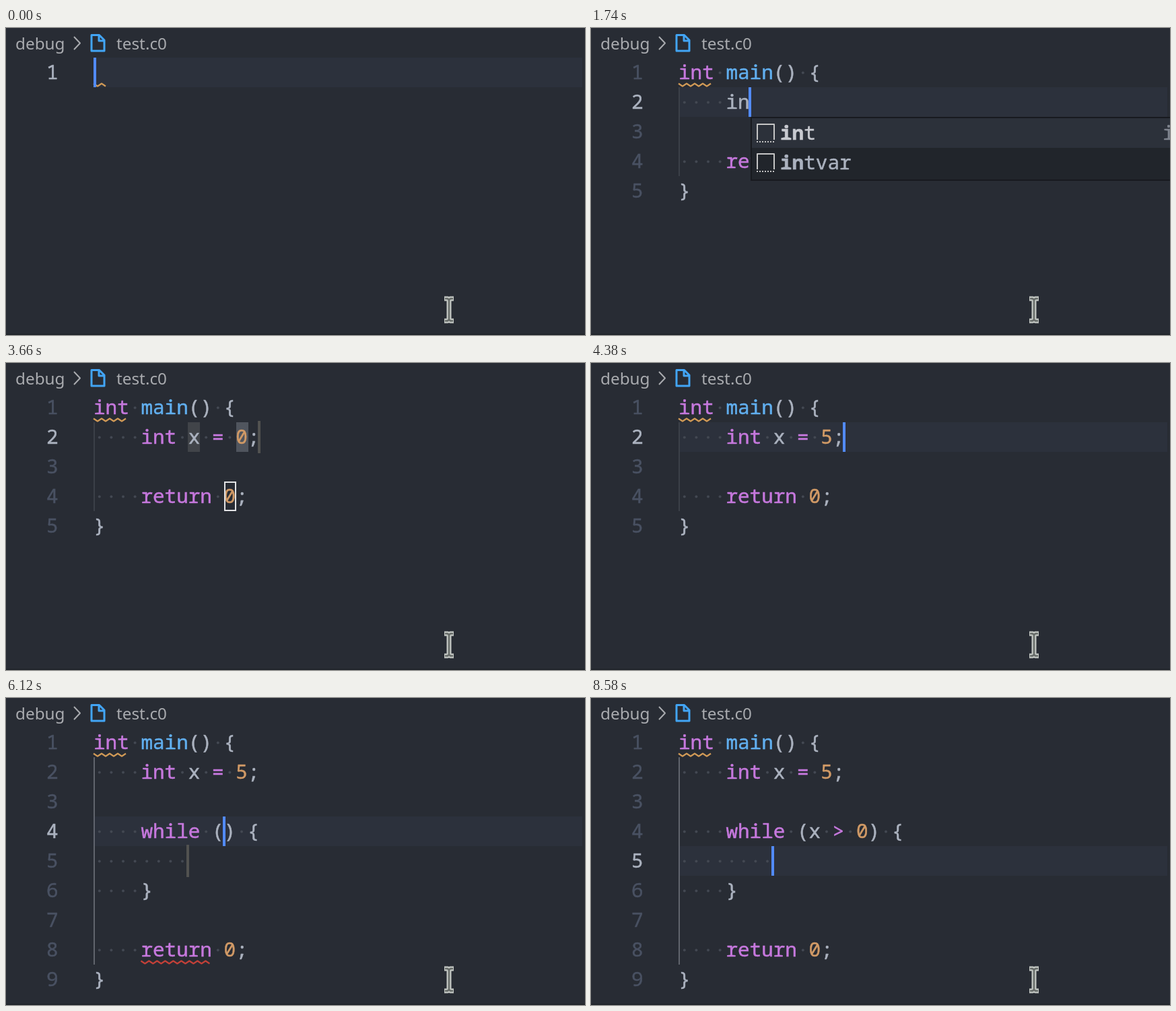
An HTML page that plays this animation: 860 px wide and 456 px high, repeating every 8.94 s.

```html
<!DOCTYPE html>
<html lang="en">
<head>
<meta charset="utf-8">
<title>Snippet typing</title>
<style>
  html, body { margin: 0; width: 100%; height: 100%; overflow: hidden; background: #282c34; }
  svg { display: block; }
  .mono { font: 29.333px "Noto Sans Mono", monospace; }
  .mono text { stroke-width: 0.5px; }
  .crumb { font: 24.3px "Noto Sans", sans-serif; fill: #a9abaf; }
  .line { fill: none; stroke-linejoin: round; }
</style>
</head>
<body>
<svg width="860" height="456" viewBox="0 0 860 456">
  <rect width="860" height="456" fill="#282c34"/>
  <text class="crumb" x="14" y="32">debug</text>
  <path class="line" d="M101 13l9 9.500l-9 9.500" stroke="#a9abaf" stroke-width="2"/>
  <path class="line" d="M127 10.500h11.500l7.500 7.500v16h-19zM138 10.500v8.500h8" stroke="#42a5f5" stroke-width="3"/>
  <text class="crumb" x="164" y="32">test.c0</text>
  <g id="view" class="mono"></g>
  <rect y="454" width="860" height="2" fill="#21252b"/>
  <g id="beam" class="line">
    <path d="M651 402h5l2 2l2-2h5M651 435h5l2-2l2 2h5M658 404v29" stroke="#c3c7c3" stroke-width="7"/>
    <path d="M652 402h4l2 2l2-2h4M652 435h4l2-2l2 2h4M658 404v29" stroke="#666b68" stroke-width="2.500"/>
  </g>
  <path id="arrow" d="M658 418v32l7-7l5 11l5-2l-5-11h10z" fill="#fff" stroke="#000" stroke-width="1.500"/>
</svg>
<script>
const LOOP = 8940, LEFT = 130, CHAR = 17.6, ROW = 44;
const view = document.getElementById('view');
const beam = document.getElementById('beam');
const arrow = document.getElementById('arrow');

const program = (...body) => ['int main() {', ...body, '', '    return 0;', '}'];
const loop = cond => program('    int x = 5;', '', `    while (${cond}) {`, '        ', '    }');
const typed = s => ({ code: [s], at: [1, s.length] });
const inBody = s => ({ code: program(s), at: [2, s.length] });
const inCond = s => ({ code: loop(s), at: [4, 11 + s.length] });

// Each step changes only the listed parts of the editor state.
const steps = [
  [0, { ...typed(''), warn: [1, 0, 1] }],
  [360, typed('m')],
  [480, { ...typed('ma'), warn: null, err: [1, 0, 2] }],
  [600, { ...typed('mai'), err: [1, 0, 3] }],
  [720, { ...typed('main'), err: [1, 0, 4] }],
  [960, { pop: { items: ['main'], hit: 4, detail: 'main function' } }],
  [1080, { ...inBody('    '), pop: null, err: null }],
  [1260, { warn: [1, 0, 3] }],
  [1500, { ...inBody('    i'), pop: { items: ['if', 'ifelse', 'int', 'intvar'], hit: 1, detail: 'if statement' } }],
  [1620, { ...inBody('    in'), pop: { items: ['int', 'intvar'], hit: 2, detail: 'int' } }],
  [1800, { ...inBody('    int'), pop: { items: ['int', 'intvar'], hit: 3, detail: 'int' }, err: [4, 4, 6] }],
  [2220, { code: program('    int n = 0;'), at: [2, 9], pop: null, sel: [2, 8], fields: [[2, 8], [2, 12]], stop: [2, 14] }],
  [2280, { marks: [[1, 1], [1, 7], [2, 5], [4, 9]] }],
  [2400, { err: null }],
  [2640, { off: true }],
  [2940, { code: program('    int x = 0;'), sel: null, marks: [], off: false }],
  [3180, { at: [2, 13], sel: [2, 12], marks: [[4, 11]] }],
  [3660, { off: true }],
  [3900, { code: program('    int x = 5;'), sel: null, marks: [], off: false }],
  [4320, { at: [2, 14] }],
  [4380, { fields: [], stop: null }],
  [4800, { code: program('    int x = 5;', '    '), at: [3, 4] }],
  [4920, { bright: true }],
  [5280, { code: program('    int x = 5;', '', '    '), at: [4, 4] }],
  [5640, { code: program('    int x = 5;', '', '    w'), at: [4, 5], pop: { items: ['while'], hit: 1, detail: 'while loop' } }],
  [5700, { err: [6, 4, 6] }],
  [6120, { ...inCond(''), pop: null, err: [8, 4, 6], stop: [5, 8] }],
  [6300, { err: [4, 11, 1] }],
  [6540, { off: true }],
  [6900, { ...inCond('x'), off: false, err: null }],
  [6960, { pop: { items: ['x', 'xor', 'xs', 'xml', 'xpos'], hit: 1, detail: '', width: 343 }, arrow: true }],
  [7080, { ...inCond('x '), pop: null, arrow: false }],
  [7200, inCond('x >')],
  [7380, inCond('x > ')],
  [7500, { err: [4, 15, 1] }],
  [7860, { off: true }],
  [8160, { ...inCond('x > 0'), off: false }],
  [8340, { err: null }],
  [8580, { at: [5, 8], stop: null }]
];

let state = { marks: [], fields: [] };
const states = steps.map(([t, change]) => [t, state = { ...state, ...change }]);

const colX = c => LEFT + c * CHAR;
const rowY = r => r * ROW;
const snap = c => Math.round(colX(c) / 2) * 2;
const barX = c => Math.max(LEFT, snap(c) - 2);
const esc = s => s.replace(/</g, '&lt;').replace(/>/g, '&gt;');
const rect = (x, y, w, h, fill, more = '') =>
  `<rect x="${x}" y="${y}" width="${w}" height="${h}" fill="${fill}" ${more}/>`;
const text = (x, y, s, fill, more = '') =>
  `<text x="${x}" y="${y}" fill="${fill}" stroke="${fill}" ${more}>${s}</text>`;
const cell = ([r, c], fill) => rect(snap(c), rowY(r), 18, ROW, fill);

function tint(token) {
  if (/^(int|return|while|=|>)$/.test(token)) return '#c678dd';
  if (/^\d/.test(token)) return '#d19a66';
  return '#abb2bf';
}

function codeLine(s, r) {
  const y = rowY(r);
  let out = '';
  [...s].forEach((ch, c) => {
    if (ch === ' ') out += `<circle cx="${colX(c + 0.5)}" cy="${y + 22.5}" r="2" fill="#434852"/>`;
  });
  for (const m of s.matchAll(/\w+|[=>]|[^\s\w]+/g)) {
    const call = m[0] === 'main' && s[m.index + 4] === '(';
    out += text(colX(m.index), y + 32, esc(m[0]), call ? '#61afef' : tint(m[0]));
  }
  return out;
}

function squiggle(span, color) {
  if (!span) return '';
  const [r, c, n] = span, end = colX(c + n), pts = [];
  for (let x = colX(c), k = 0; x <= end + 1; x += 6, k++)
    pts.push(`${x},${rowY(r) + (k % 2 ? 42.5 : 38.5)}`);
  return `<polyline class="line" points="${pts.join(' ')}" stroke="${color}" stroke-width="2.200"/>`;
}

function popup({ items, hit, detail, width = 860 }, [r, c]) {
  const x = Math.round(colX(c)) + 1, y = rowY(r + 1), h = items.length * ROW + 7;
  let out = rect(x, y, width, h, '#181a1f') +
    rect(x + 2, y + 2, width - 4, h - 4, '#21252b') +
    rect(x + 2, y + 2, width - 4, ROW, '#2c313a');
  items.forEach((s, i) => {
    const top = y + 2 + i * ROW, color = i ? '#abb2bf' : '#c8cad0';
    out += `<path class="line" d="M${x + 10} ${top + 32}v-23h25v23" stroke="#c5c5c5" stroke-width="2"/>` +
      `<path d="M${x + 9} ${top + 35}h27" stroke="#c5c5c5" stroke-width="2" stroke-dasharray="2 2"/>` +
      text(x + 44, top + 32, `<tspan font-weight="700">${s.slice(0, hit)}</tspan>${s.slice(hit)}`, color);
  });
  return out + text(x + 612, y + 34, detail, '#7f848e');
}

function draw(s) {
  const [row, col] = s.at, n = s.code.length;
  let out = s.sel ? '' : rect(LEFT, rowY(row), 726, ROW, '#2c313c');
  if (n > 1) out += rect(LEFT, 88, 2, (n - 2) * ROW, s.bright ? '#60646d' : '#3b4048');
  if (s.sel) out += cell(s.sel, '#3e4451');
  for (const f of s.fields) out += cell(f, 'rgba(124,124,124,.3)');
  if (s.stop) out += rect(barX(s.stop[1]), rowY(s.stop[0]) - 2, 4, 48, '#525250');
  s.code.forEach((line, i) => {
    const r = i + 1;
    out += text(77.6, rowY(r) + 32, r, r === row ? '#abb2bf' : '#495162', 'text-anchor="end"') + codeLine(line, r);
  });
  out += squiggle(s.warn, '#d19a56') + squiggle(s.err, '#c24038');
  for (const [r, c] of s.marks)
    out += rect(snap(c) + 1, rowY(r) + 1, 16, ROW - 2, 'none', 'stroke="#e2e3e5" stroke-width="2"');
  if (!s.off) out += rect(barX(col), rowY(row), 4, ROW, '#528bff');
  if (s.pop) out += popup(s.pop, s.at);
  view.innerHTML = out;
  beam.style.display = s.arrow ? 'none' : '';
  arrow.style.display = s.arrow ? '' : 'none';
}

let shown;
const start = performance.now();
function tick() {
  const t = (performance.now() - start) % LOOP;
  const now = states.findLast(([at]) => at <= t)[1];
  if (now !== shown) draw(shown = now);
  requestAnimationFrame(tick);
}
tick();
</script>
</body>
</html>
```
